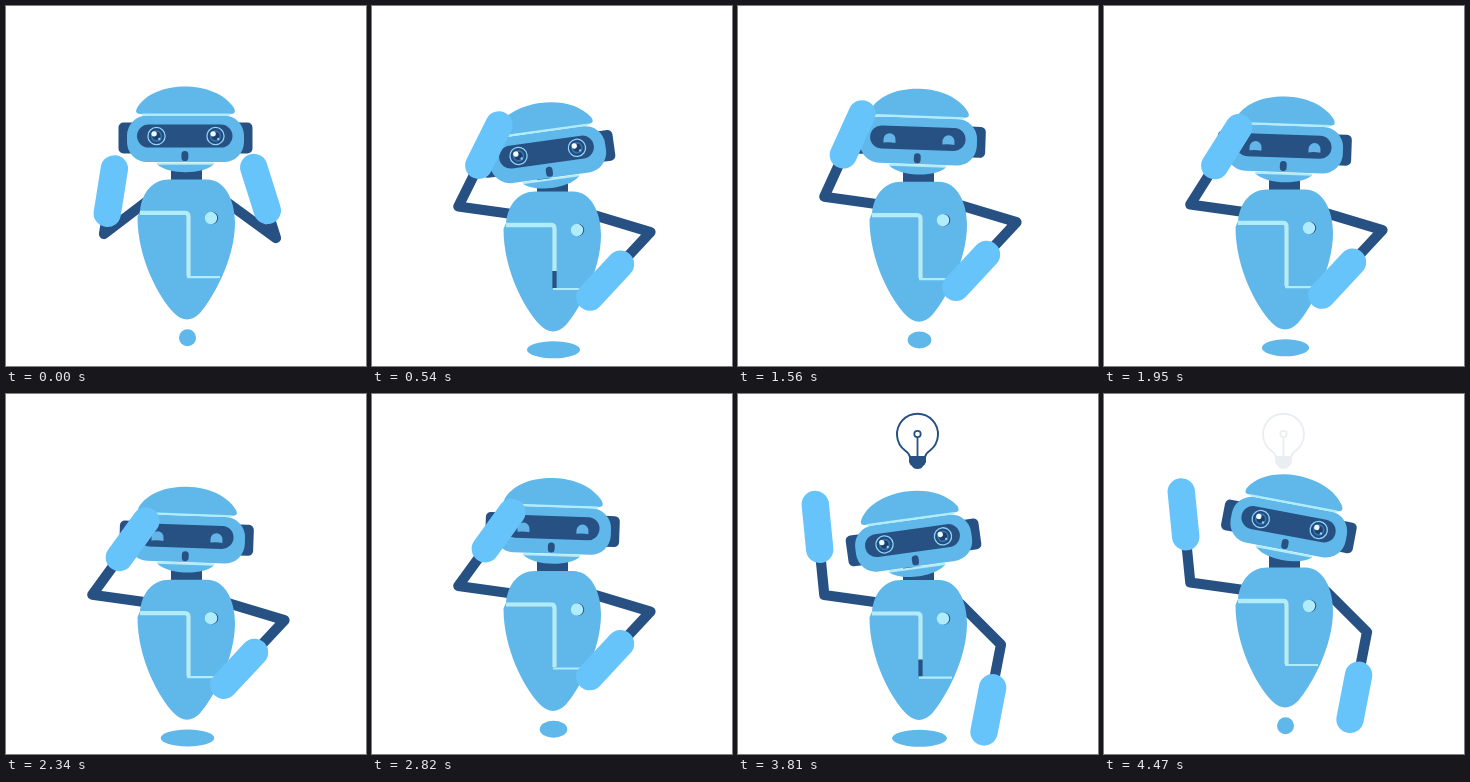
These frames come from a looping animation (360 px wide and 360 px high, 4.5 s). An HTML page:

```html
<!DOCTYPE html>
<html lang="en">
<head>
<meta charset="utf-8">
<title>Thinking robot</title>
<style>
html, body { margin: 0; height: 100%; overflow: hidden; background: #fff; }
svg { display: block; width: 100%; height: 100%; }
.body { fill: #5fb8e9; }
.dark { fill: #275083; }
.bone { fill: none; stroke: #275083; stroke-width: 10.2; stroke-linecap: round; stroke-linejoin: round; }
.hand { stroke: #66c4fb; stroke-width: 27.4; stroke-linecap: round; }
.seam { fill: none; stroke: #b0ecfb; stroke-width: 4.6; }
.groove { stroke: #275083; stroke-width: 4.2; }
.thin { stroke-width: 2.2; }
</style>
</head>
<body>
<svg viewBox="0 0 360 360">
  <defs>
    <g id="openEye">
      <circle r="8.6" fill="#214a80" stroke="#8fd4f5" stroke-width="1.3"/>
      <circle r="5.8" fill="#3873a8"/>
      <circle r="4" fill="#1c3f70"/>
      <circle cx="-2.4" cy="-2.2" r="2.7" fill="#eefaff"/>
      <circle cx="2.8" cy="3" r="1.2" fill="#8fd4f5"/>
    </g>
    <path id="halfEye" d="M-6 4.5V1A6 6 0 0 1 6 1V4.5Q0 3.5-6 4.5Z" fill="#62b5e6"/>
    <path id="panel" pathLength="100" d="M134 207H179Q182.500 207 182.500 210.500V270"/>
  </defs>

  <ellipse id="shadow" class="body" cx="181.5" ry="8.5"/>

  <g id="bulb">
    <path d="M172 63Q171 59 167 56.500A20.500 20.500 0 1 1 192 56.500Q188 59 187 63" fill="#fff" stroke="#275083" stroke-width="2"/>
    <path d="M179.500 43V63" stroke="#275083" stroke-width="1.800"/>
    <circle cx="179.500" cy="40" r="3.200" fill="#fff" stroke="#275083" stroke-width="1.800"/>
    <path class="dark" d="M171 62H188V68Q187 71 185 72Q184 75 179.500 75T174 72Q172 71 171 68Z"/>
  </g>

  <g id="robot">
    <path id="boneL" class="bone"/>
    <path id="boneR" class="bone"/>
    <path class="dark" d="M165 160H196V177H165Z"/>
    <path class="body" d="M134 205C136 186 147 173.500 163 173.500H201C219 173.500 229 194 229 217C229 252 208 291 194 307Q181 320 168 307C152.500 291 131.500 252 131.500 211Z"/>
    <use href="#panel" class="seam groove"/>
    <use id="flow" href="#panel" class="seam"/>
    <path class="seam thin" d="M181 271H214"/>
    <circle class="dark" cx="206" cy="212" r="6.200"/>
    <circle cx="205" cy="212" r="6.200" fill="#b0ecfb"/>

    <g id="head">
      <rect class="dark" x="112.500" y="116.500" width="20" height="31" rx="5"/>
      <rect class="dark" x="226.500" y="116.500" width="20" height="31" rx="5"/>
      <path class="body" d="M131 102C140 87 160 80.500 179 80.500S218 87 228 102Q231 108 224 108H135Q128 108 131 102Z"/>
      <path class="body" d="M151 158H208C198 169 161 169 151 158Z"/>
      <rect class="body" x="121" y="109.500" width="117" height="46.500" rx="20"/>
      <path class="seam thin" d="M136 108.500H224M151 157.500H208"/>
      <rect class="dark" x="131" y="118.500" width="95.500" height="23" rx="11.500"/>
      <rect class="dark" x="175.500" y="145" width="6.800" height="10" rx="3.400"/>
      <g id="open">
        <use href="#openEye" x="150.500" y="130"/><use href="#openEye" x="209.500" y="130"/>
      </g>
      <g id="half">
        <use href="#halfEye" x="150.500" y="131"/><use href="#halfEye" x="209.500" y="131"/>
      </g>
    </g>

    <path id="handL" class="hand"/>
    <path id="handR" class="hand"/>
  </g>
</svg>
<script>
const LOOP = 4500, BOB = 1500;
const $ = id => document.getElementById(id);
const set = (id, attrs) => {
  for (const name in attrs) $(id).setAttribute(name, attrs[name]);
};
const linear = p => p;
const smooth = p => (1 - Math.cos(Math.PI * p)) / 2;

// Value at time t along alternating time, value keys.
function track(t, keys, ease = smooth) {
  if (t <= keys[0]) return keys[1];
  for (let i = 2; i < keys.length; i += 2) {
    if (t < keys[i]) {
      const p = (t - keys[i - 2]) / (keys[i] - keys[i - 2]);
      return keys[i - 1] + (keys[i + 1] - keys[i - 1]) * ease(p);
    }
  }
  return keys[keys.length - 1];
}

// Angle is clockwise from straight up; the hand begins at distance near.
function arm(side, shoulder, [x, y], angle, near) {
  const a = angle * Math.PI / 180;
  const at = d => `${x + d * Math.sin(a)} ${y - d * Math.cos(a)}`;
  set('bone' + side, { d: `M${shoulder}L${x} ${y}L${at(near)}` });
  set('hand' + side, { d: `M${at(near)}L${at(near + 45)}` });
}

function draw(t) {
  const y = track(t % BOB, [0, 0, 60, 2.2, 270, 6.1, 540, 12, 690, 14, 840, 12.2, 1110, 8.5, 1470, 0], linear);
  set('robot', { transform: `translate(0 ${y})` });
  set('shadow', { cy: 331.8 + y, rx: 8.5 + 1.5 * y });

  const tilt = track(t, [0, 0, 480, -7.9, 900, -7.9, 1400, 2, 2800, 2, 3240, -7.9, 3900, -7.9, 4400, 10.7]);
  const drop = Math.max(0, -tilt) * 0.45;
  set('head', { transform: `translate(0 ${drop}) rotate(${tilt} 180 161)` });

  const squint = t >= 1000 && t < 3450;
  $('open').style.display = squint ? 'none' : '';
  $('half').style.display = squint ? '' : 'none';

  const raise = track(t, [0, 0, 480, 1]);
  arm('L', '140 196',
    [98 - 11.7 * raise, 228 - 39.5 * raise],
    track(t, [0, 9, 480, 26.5, 1560, 24.5, 2200, 36, 2880, 36, 3270, -0.6, 3420, -5.7]),
    21 + 25 * raise);

  const lower = track(t, [3130, 0, 3270, 0.34, 3560, 1], linear);
  arm('R', '222 197',
    [270 + 8.5 * raise - 15.5 * lower, 232 - 18 * raise + 24 * lower],
    track(t, [0, -17.5, 480, -137]) - 32 * lower,
    29 + 15 * raise);

  const filled = t < 15 ? 100 : track(t % 3270, [0, 0, 640, 100], linear);
  set('flow', { 'stroke-dasharray': `${filled} 200` });
  $('flow').style.display = filled ? '' : 'none';

  const size = track(t, [3140, 0, 3270, 0.68, 3390, 1.09, 3500, 1], linear);
  set('bulb', {
    transform: `translate(179.5 75) scale(${size}) translate(-179.5 -75)`,
    opacity: track(t, [4340, 1, 4470, 0.09], linear)
  });
}

const start = performance.now();
function tick() {
  draw((performance.now() - start) % LOOP);
  requestAnimationFrame(tick);
}
tick();
</script>
</body>
</html>
```
